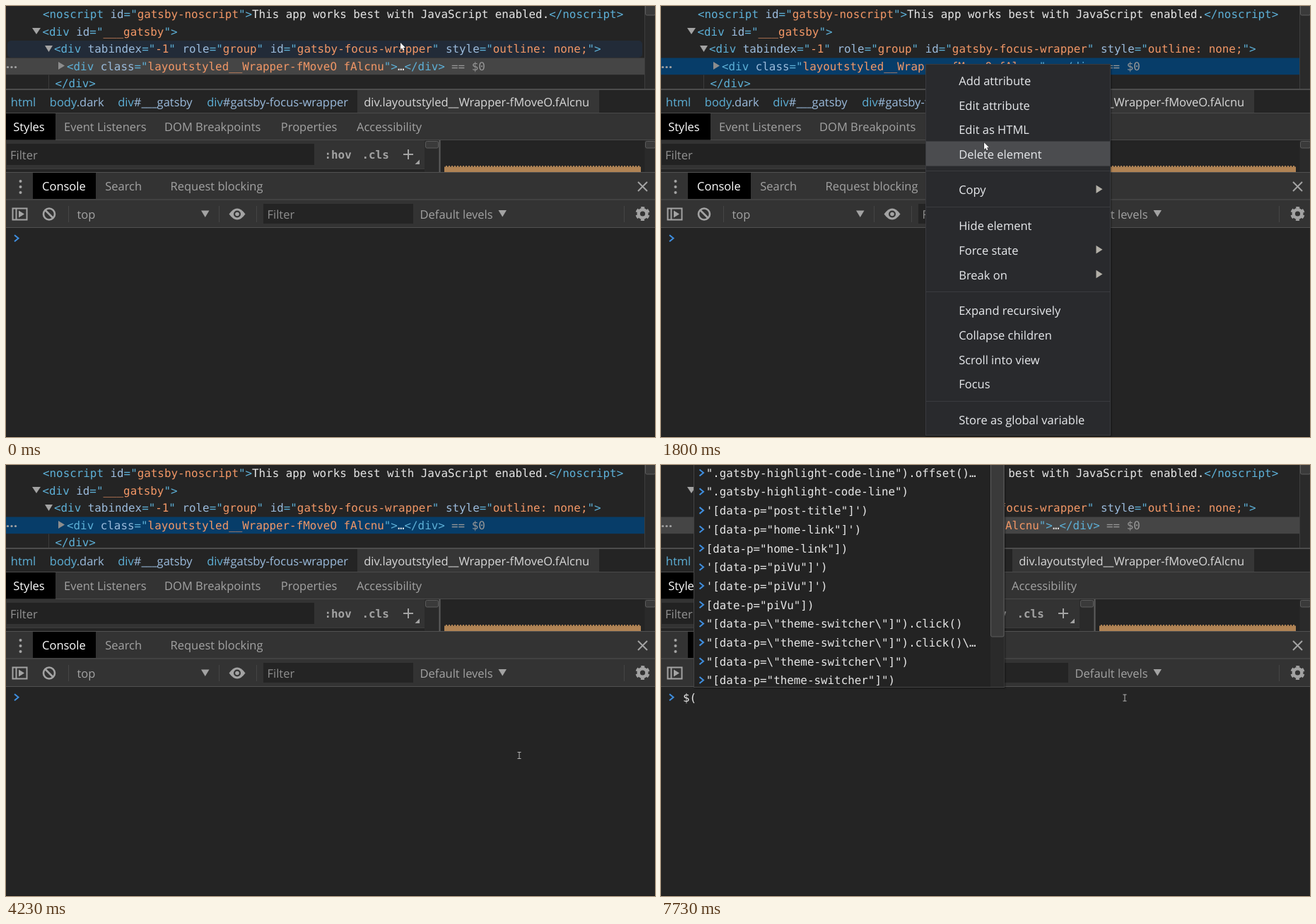
Recreate the animation shown at these times as an HTML page. Size 918 px wide and 610 px high, loop 8 s.

```html
<!DOCTYPE html>
<html lang="en">
<head>
<meta charset="utf-8">
<title>Copying a selector into the console</title>
<style>
  html, body { margin: 0; width: 100%; height: 100%; overflow: hidden; background: #242424; }
  svg { display: block; width: 918px; height: 610px; }
  text { white-space: pre; text-rendering: geometricPrecision; }
  .ui { font: 16.5px "Open Sans", "Noto Sans", sans-serif; }
  .code { font: 15.86px "DejaVu Sans Mono", "Noto Sans Mono", monospace; }
  .bold { font-weight: bold; }
  .shade { filter: drop-shadow(1px 1px 1px rgba(0, 0, 0, .4)); }
</style>
</head>
<body>
<svg id="stage" viewBox="0 0 918 610" xmlns="http://www.w3.org/2000/svg"></svg>
<script>
const LOOP = 8000;
const PITCH = 9.55;
const BG = '#242424', BAR = '#333333', EDGE = '#4a4a4a', DIM = '#a3a3a3', LIGHT = '#e6e6e6';
const TAG = '#5db0d7', ATTR = '#9bbbdc', VALUE = '#f29766', BLUE = '#3f8fe0';
const MENU = '#292a2d', MENU_HOT = '#4b4c4f', MENU_TEXT = '#e8eaed', MENU_EDGE = '#3a3b3f';

const esc = s => s.replace(/&/g, '&amp;').replace(/</g, '&lt;');
const rect = (x, y, w, h, fill, more = '') =>
  `<rect x="${x}" y="${y}" width="${w}" height="${h}" fill="${fill}" ${more}/>`;
const path = (d, fill, more = '') => `<path d="${d}" fill="${fill}" ${more}/>`;
const line = (d, color, width = 1, more = '') =>
  path(d, 'none', `stroke="${color}" stroke-width="${width}" ${more}`);
const circle = (x, y, r, fill, more = '') =>
  `<circle cx="${x}" cy="${y}" r="${r}" fill="${fill}" ${more}/>`;
const text = (x, y, s, fill = DIM, cls = 'ui', more = '') =>
  `<text x="${x}" y="${y}" fill="${fill}" class="${cls}" ${more}>${esc(s)}</text>`;
const span = (s, fill) => `<tspan fill="${fill}">${esc(s)}</tspan>`;
const group = (id, body, more = '') => `<g id="${id}" ${more}>${body}</g>`;
const down = (x, y, w, h, fill) => path(`M${x} ${y}h${w}l${-w / 2} ${h}z`, fill);
const right = (x, y, w, h, fill) => path(`M${x} ${y}l${w} ${h / 2}l${-w} ${h / 2}z`, fill);
const chevron = (x, y) => line(`M${x} ${y - 4.5}l5.5 4.5l-5.5 4.5`, BLUE, 2);

// Colours one line of markup
function markup(x, y, src) {
  const spans = src.replace(/(<\/?\w+|>)| (\w+)="([^"]*)"|([^<>]+)/g, (_, tag, name, value, plain) =>
    tag ? span(tag, TAG)
      : name ? span(' ' + name, ATTR) + span('="', TAG) + span(value, VALUE) + span('"', TAG)
      : span(plain, LIGHT));
  return `<text x="${x}" y="${y}" class="code">${spans}</text>`;
}

function crumb(x, tag, rest) {
  return `<text x="${x}" y="141.5" class="ui">${span(tag, TAG)}${span(rest, ATTR)}</text>`;
}

const thumb = (x, y, w, h) => rect(x, y, w, h, '#3a3a3a', 'rx="2" stroke="#5c5c5c"');

function elementsPane() {
  return rect(2, 49, 898, 24, '#222b38', 'rx="5" id="hover3"') +
    rect(2, 97.5, 898, 20, '#222b38', 'rx="5" id="hover5"') +
    rect(0, 73.5, 903.5, 23.7, '#454545', 'id="row"') +
    line('M60.5 97.5V117', '#3c3c3c') +
    down(37, 31, 12, 9, DIM) + down(55, 56, 11, 9, DIM) + right(74, 79, 9, 11, '#8d8d8d') +
    [2.5, 8, 13.5].map(x => circle(x, 86.5, 1.6, DIM)).join('') +
    markup(52, 17.3, '<noscript id="gatsby-noscript">This app works best with JavaScript enabled.</noscript>') +
    markup(51.5, 41.5, '<div id="___gatsby">') +
    markup(68, 66.2, '<div tabindex="-1" role="group" id="gatsby-focus-wrapper" style="outline: none;">') +
    markup(86, 90.6, '<div class="layoutstyled__Wrapper-fMoveO fAlcnu">…</div>') +
    text(630, 90.6, '== $0', '#979797', 'code', 'font-style="italic"') +
    markup(69.5, 115.4, '</div>') +
    rect(903.5, 0, 15, 117, '#2a2a2a') + line('M903.5 0V117', '#3d3d3d') + thumb(904.5, -6, 14, 19);
}

function stylesPane() {
  return rect(0, 117, 918, 118, BG) + line('M0 118H918', '#5a5a5a', 1.5) +
    rect(497, 119, 342, 32, '#363636') +
    crumb(6.8, 'html', '') + crumb(61.8, 'body', '.dark') +
    crumb(158.2, 'div', '#___gatsby') + crumb(284.2, 'div', '#gatsby-focus-wrapper') +
    text(506.2, 141.5, 'div.layoutstyled__Wrapper-fMoveO.fAlcnu', '#d8d8d8') +
    rect(0, 151, 918, 39, BAR) + line('M0 151.5H918M0 189.5H918', EDGE) +
    rect(0, 152, 70, 37.5, '#000') + text(10.2, 177.3, 'Styles', '#fff') +
    [[82, 'Event Listeners'], [224, 'DOM Breakpoints'], [388.8, 'Properties'], [496, 'Accessibility']]
      .map(([x, s]) => text(x, 177.3, s)).join('') +
    rect(0, 190, 592, 40, BAR) + rect(1, 195, 435, 30, '#222222') + line('M0 230.5H592', '#3c3c3c') +
    text(6, 216.5, 'Filter', '#929292') +
    text(450.5, 215.5, ':hov', DIM, 'code bold') + text(503.5, 215.5, '.cls', DIM, 'code bold') +
    line('M569 203V217M562 210H576', DIM, 2) + path('M585 217.5v6.5h-6.5z', DIM) +
    rect(592, 190, 21, 45, '#2a2a2a') + thumb(593.5, 191.5, 18, 9.5) +
    line('M613.5 190V235', '#5e5e5e', 2) +
    rect(620, 226, 278, 9, '#b08354') + line('M620 226.8H898', BG, 1.6, 'stroke-dasharray="2 2"') +
    rect(903.5, 190, 15, 45, '#2a2a2a') + thumb(904.5, 191.5, 14, 9.5);
}

function drawerPane() {
  return rect(0, 235, 918, 79, BAR) + line('M0 235.5H918M0 274H918M0 313.5H918', '#515151') +
    [248, 256, 264].map(y => circle(20.5, y, 2, DIM)).join('') +
    rect(38, 236, 89, 37, '#000') + text(51, 261, 'Console', '#fff') +
    text(140.2, 261, 'Search') + text(232.5, 261, 'Request blocking') +
    line('M894 249l13 13m0-13l-13 13', DIM, 2) +
    rect(9.5, 286.5, 20, 16, 'none', `stroke="${DIM}" stroke-width="2"`) +
    line('M14.5 287V302', DIM, 2) + right(18, 289.5, 8, 10, DIM) +
    circle(61, 294.5, 8, 'none', `stroke="${DIM}" stroke-width="2.6"`) + line('M55.5 289l11 11', DIM, 2.6) +
    line('M88.5 283V306M301.5 283V306M354.5 283V306M874.5 283V306', '#454545') +
    text(100.5, 300.6, 'top') + down(276, 289.5, 11.5, 9.5, DIM) +
    path('M315.5 294.5Q327 278.5 338.5 294.5Q327 310.5 315.5 294.5z', DIM) +
    circle(327, 294.5, 5, BAR) + circle(327, 294.5, 2.8, DIM) +
    rect(364, 280, 212, 28, BG) + text(369.5, 300.6, 'Filter', '#8f8f8f') +
    text(585.5, 300.6, 'Default levels') + down(696.5, 289, 11.5, 9.5, DIM) +
    circle(900.5, 294, 5.8, 'none', `stroke="${DIM}" stroke-width="4.4"`) +
    circle(900.5, 294, 8.8, 'none',
      `stroke="${DIM}" stroke-width="2.6" stroke-dasharray="5 4.21" stroke-dashoffset="-2.1"`);
}

// Context menus: a label's y is the middle of its row; `true` marks an arrow, `false` a disabled item
const mainItems = [
  [106, 'Add attribute'], [140.7, 'Edit attribute'], [175.3, 'Edit as HTML'], [210, 'Delete element'],
  [260.5, 'Copy', true],
  [311.3, 'Hide element'], [346, 'Force state', true], [380.7, 'Break on', true],
  [431.3, 'Expand recursively'], [466, 'Collapse children'], [500.8, 'Scroll into view'], [535.5, 'Focus'],
  [586.5, 'Store as global variable']
];
const copyItems = [
  [260.5, 'Cut element'], [295.2, 'Copy element'], [330, 'Paste element', false],
  [380.5, 'Copy outerHTML'], [415.2, 'Copy selector'], [450, 'Copy JS path'],
  [484.7, 'Copy styles'], [519.3, 'Copy XPath'], [554, 'Copy full XPath']
];

function menu(id, x, y, w, h, items, seps) {
  return group(id,
    rect(x + .5, y + .5, w - 1, h - 1, MENU, `stroke="${MENU_EDGE}" class="shade"`) +
    rect(x + 1, 0, w - 2, 35, MENU_HOT, `id="${id}Hot"`) +
    seps.map(s => line(`M${x + 1} ${s}H${x + w - 1}`, MENU_EDGE)).join('') +
    items.map(([mid, label, kind]) =>
      text(x + 47.2, mid + 5.8, label, kind === false ? '#77797d' : MENU_TEXT) +
      (kind ? right(x + 241.5, mid - 7, 9, 11.5, '#b3b0a8') : '')).join(''));
}

const history = [
  '".gatsby-highlight-code-line").offset()…', '".gatsby-highlight-code-line")',
  `'[data-p="post-title"]')`, `'[data-p="home-link"]')`, '[data-p="home-link"])',
  `'[data-p="piVu"]')`, `'[date-p="piVu"]')`, '[date-p="piVu"])',
  '"[data-p=\\"theme-switcher\\"]").click()', '"[data-p=\\"theme-switcher\\"]").click()\\…',
  '"[data-p=\\"theme-switcher\\"]")', '"[data-p="theme-switcher"]")'
];
const clip = s => s.length > 40 ? s.slice(0, 39) + '…' : s;

function popup(id, x, prefix) {
  const rows = history.map((s, i) => {
    const mid = 11 + i * 26.68;
    return chevron(x + 8.5, mid) + text(x + 17.7, mid + 5.8, clip(prefix + s), LIGHT, 'code');
  }).join('');
  return group(id,
    rect(x + .5, -3, 439, 317.5, '#232323', 'stroke="#454545" class="shade"') +
    rect(x + 420, 0, 19.5, 314, '#2a2a2a') + thumb(x + 420.5, -6, 18.5, 249) + rows);
}

const arrow = 'M0 0V9.6L2.2 7.6L3.7 11L5.4 10.2L3.9 7H7z';
const beam = 'M-2.5 -4.5H2.5M0 -4.5V4.5M-2.5 4.5H2.5';

const stage = document.getElementById('stage');
stage.innerHTML = rect(0, 0, 918, 610, BG) + elementsPane() + stylesPane() + drawerPane() +
  line('M0 609.5H918', '#1b1b1b') +
  chevron(12, 328.8) + text(31, 334.8, '', LIGHT, 'code', 'id="typed"') +
  group('preview', line('M15.5 347.5l-5 4.5l5 4.5', '#777', 1.6) + circle(18.5, 352, 1.2, '#777') +
    text(31, 358, 'ƒ $(selector, [startNode])', '#8a8a8a', 'code', 'font-style="italic"')) +
  rect(32.3, 318, 1.4, 22, '#d0d0d0', 'id="caret"') +
  popup('popupA', 27, '$(') + popup('popupB', 46, '') +
  menu('main', 374, 82, 262, 526, mainItems, [233.5, 284.5, 404.5, 559.5]) +
  menu('copy', 632, 237, 216, 340, copyItems, [353.5]) +
  circle(0, 0, 9, '#b5a81c', 'id="click" fill-opacity=".9"') +
  path(arrow, '#fff', 'id="arrow" stroke="#111" stroke-width=".7" paint-order="stroke"') +
  line(beam, '#b4b4b4', 1, 'id="beam"');

const parts = Object.fromEntries([...stage.querySelectorAll('[id]')].map(e => [e.id, e]));
const show = (id, on) => parts[id].style.display = on ? '' : 'none';
const move = (id, x, y) => parts[id].setAttribute('transform', `translate(${x} ${y})`);

// Pointer route: time, x, y
const route = [
  [0, 558, 52], [40, 558, 52], [260, 528, 80], [430, 478, 99], [650, 402, 92], [850, 374, 81],
  [1400, 374, 81], [1560, 420, 122], [1800, 457, 193], [1960, 471, 240], [2090, 475, 262],
  [2720, 475, 262], [2860, 555, 262], [2980, 631.5, 264.5], [3200, 684, 296], [3540, 718, 358],
  [3720, 721.5, 391], [3960, 726, 408], [4230, 726, 411],
  [4380, 726, 411], [4560, 712, 394], [4950, 668, 343], [5200, 656, 329.5], [LOOP, 656, 329.5]
];

function pointer(t) {
  const i = Math.max(1, route.findIndex(p => p[0] > t));
  const [a, b] = [route[i - 1], route[i]];
  const k = (t - a[0]) / (b[0] - a[0]);
  return [a[1] + (b[1] - a[1]) * k, a[2] + (b[2] - a[2]) * k];
}

function heat(id, item) {
  show(id + 'Hot', !!item);
  if (item) parts[id + 'Hot'].setAttribute('y', item[0] - 18.5);
}

function draw(t) {
  const within = (from, to) => t >= from && t < to;
  const [x, y] = pointer(t);
  const under = items => items.find(([mid, , kind]) => kind !== false && Math.abs(y - mid + 1) < 17.4);

  show('hover3', t < 880 && y >= 49 && y < 73);
  show('hover5', t < 880 && y >= 97);
  parts.row.setAttribute('fill', within(980, 5380) ? '#073d69' : '#454545');

  const subOpen = within(2420, 4230);
  show('main', within(1110, 4230));
  show('copy', subOpen);
  heat('main', subOpen ? mainItems[4] : x > 374 && under(mainItems));
  heat('copy', x > 633 && under(copyItems));

  show('click', within(880, 1110) || within(4110, 4230) || within(5280, 5380));
  move('click', x, y + .5);
  show('arrow', t < 1110 || within(1260, 4230));
  move('arrow', x, y);
  show('beam', t >= 4230);
  move('beam', x, y);

  const typed = t < 6810 ? '' : t < 7220 ? '$' : '$(';
  parts.typed.textContent = typed;
  show('caret', within(5380, 5790) || within(6350, 7730));
  move('caret', typed.length * PITCH, 0);
  show('preview', within(6860, 7220));
  show('popupA', within(6860, 7220));
  show('popupB', t >= 7220);
}

function tick() {
  draw(performance.now() % LOOP);
  requestAnimationFrame(tick);
}
tick();
</script>
</body>
</html>
```
